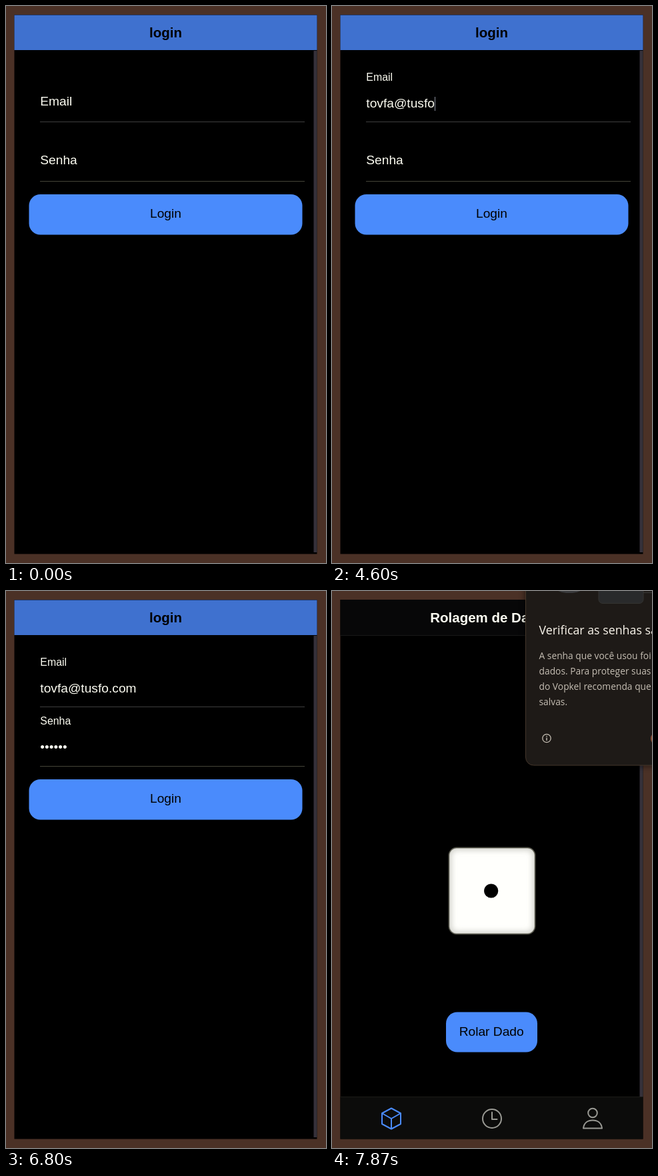
These frames come from a looping animation (480x834 px, 8 s). An HTML page:

```html
<!DOCTYPE html>
<html lang="pt">
<head>
<meta charset="utf-8">
<title>Login</title>
<style>
  html, body { margin: 0; width: 100%; height: 100%; overflow: hidden; background: #4b3126; }
  svg { position: absolute; left: 0; top: 0; display: block; }
  text { font-family: "Liberation Sans", Arial, sans-serif; font-size: 19.2px; fill: #fdfdf2; white-space: pre; }
  .title { font-size: 20.5px; font-weight: bold; }
  .mid { text-anchor: middle; }
  .dark { fill: #000; }
  .note text { font-family: "Open Sans", "Noto Sans", sans-serif; font-size: 13.8px; fill: #c6bfb4; }
  .note .head { font-size: 17.8px; fill: #fbf6ec; }
  .icon { fill: none; stroke: #9a9a94; stroke-width: 2; stroke-linecap: round; stroke-linejoin: round; }
</style>
</head>
<body>
<svg width="480" height="834" viewBox="0 0 480 834">
  <defs>
    <filter id="soft" x="-20%" y="-20%" width="140%" height="140%"><feGaussianBlur stdDeviation="4"/></filter>
    <clipPath id="face"><rect x="176" y="385" width="128" height="128" rx="11"/></clipPath>
  </defs>
  <rect width="480" height="834" fill="#4b3126"/>
  <rect x="12.5" y="13" width="454" height="807.5"/>

  <g id="loginPage">
    <rect x="12.5" y="13.5" width="454" height="52.5" fill="#3f71cf"/>
    <rect x="461.5" y="67" width="5" height="751" fill="#35313a"/>
    <text class="title mid dark" x="239.5" y="46.5">login</text>
    <rect x="51" y="173" width="397" height="1" fill="#3f3f3f"/>
    <rect x="51" y="262" width="397" height="1" fill="#444438"/>
    <text id="emailLabel" x="51.3">Email</text>
    <text id="passLabel" x="51.3">Senha</text>
    <text id="email" x="51.3" y="152"></text>
    <text id="pass" x="51.3" y="240"></text>
    <rect id="caret" width="1" height="21" fill="#8a8f9c"/>
    <rect id="button" x="34.5" y="282" width="410" height="60.5" rx="17"/>
    <text class="mid dark" x="239.5" y="317">Login</text>
  </g>

  <g id="dicePage">
    <rect x="12.5" y="13" width="454" height="53" fill="#070708"/>
    <rect x="12.5" y="66" width="454" height="1" fill="#191918"/>
    <rect x="461.5" y="67" width="5" height="690" fill="#35313a"/>
    <text class="title mid" x="239.5" y="46.5">Rolagem de Dados</text>

    <rect x="175.5" y="384.5" width="129" height="129" rx="11.5" fill="#fffffc" stroke="#55554a" stroke-width="2"/>
    <g clip-path="url(#face)">
      <rect x="175" y="384" width="130" height="130" rx="12" fill="none" stroke="#cfcfc8" stroke-width="8" filter="url(#soft)"/>
    </g>
    <circle cx="238.7" cy="449" r="10.6"/>

    <rect x="171" y="630.5" width="137" height="60" rx="17" fill="#4a8bfc"/>
    <text class="mid dark" x="239.2" y="665.5">Rolar Dado</text>

    <rect x="12.5" y="757" width="454" height="63.5" fill="#0c0c0b"/>
    <rect x="12.5" y="757" width="454" height="1" fill="#1c1c18"/>
    <path class="icon" style="stroke:#4a8bfc" d="M89 774.5 103 782V798L89 805.5 75 798V782ZM75 782 89 790 103 782M89 790V805"/>
    <g class="icon">
      <circle cx="240" cy="790" r="14"/>
      <path d="M240 780.5V791H247.5"/>
      <circle cx="391" cy="781.5" r="6.8"/>
      <path d="M377 804.5C378 796 384 792.5 391 792.5S404 796 405 804.5Z"/>
    </g>
  </g>

  <g id="notice" class="note">
    <rect x="289" y="-30" width="230" height="293" rx="14" fill="#000" opacity=".5" filter="url(#soft)"/>
    <rect x="290.5" y="-30" width="230" height="291" rx="12" fill="#1e1a17" stroke="#44362a"/>
    <ellipse cx="356" cy="-8" rx="24" ry="11" fill="#393a3c"/>
    <rect x="400" y="-20" width="67" height="38.5" rx="6" fill="#292a2b" stroke="#343432"/>
    <rect x="467" y="2" width="13" height="1" fill="#3a3a38"/>
    <text class="head" x="310.5" y="64.5">Verificar as senhas salvas</text>
    <g id="noticeBody"></g>
    <circle cx="322" cy="220.5" r="6.2" fill="none" stroke="#c6bfb4" stroke-width="1.3"/>
    <path d="M322 219.5V224M322 216.8V218.2" stroke="#c6bfb4" stroke-width="1.4"/>
    <circle cx="488" cy="221" r="10" fill="#8f5036"/>
  </g>
</svg>
<script>
  const LOOP = 8000;
  const EMAIL = "tovfa@tusfo.com";
  const emailKeys = [1730, 1870, 2000, 2200, 2330, 2730, 3000, 3130, 3270, 3530, 3600, 4670, 4800, 4870, 5000];
  const passKeys = [5670, 5800, 5870, 6070, 6130, 6270];
  const emailCaret = [[930, 1470], [1730, 4070], [4600, 5130]];
  const passCaret = [[5200, 6800]];
  const pressColors = [[0, "#4a8bfc"], [7200, "#4786f4"], [7330, "#4480ea"], [7400, "#417ade"]];
  const noticeLines = [
    "A senha que você usou foi exposta",
    "dados. Para proteger suas contas",
    "do Vopkel recomenda que você",
    "salvas."
  ];

  const $ = id => document.getElementById(id);
  const set = (el, attrs) => { for (const k in attrs) el.setAttribute(k, attrs[k]); };
  const show = (el, on) => { el.style.display = on ? "" : "none"; };
  const typed = (keys, t) => keys.filter(k => k <= t).length;
  const within = (spans, t) => spans.some(([a, b]) => t >= a && t < b);

  noticeLines.forEach((line, i) => {
    const row = document.createElementNS("http://www.w3.org/2000/svg", "text");
    set(row, { x: 310.5, y: 101.5 + i * 23.2 });
    row.textContent = line;
    $("noticeBody").append(row);
  });

  // The label shrinks upward at 15 pictures per second.
  function floatLabel(el, t, start, restY) {
    const tick = Math.floor((t + 4) * 0.015) / 0.015;
    const p = Math.min(1, Math.max(0, (tick - start) / 150));
    const e = p * p * (3 - 2 * p);
    el.setAttribute("y", restY - 37.5 * e);
    el.style.fontSize = 19.2 - 3.3 * e + "px";
  }

  function draw(t) {
    const onLogin = t < 7470;
    show($("loginPage"), onLogin);
    show($("dicePage"), !onLogin);
    show($("notice"), t >= 7870);
    if (!onLogin) return;

    $("email").textContent = EMAIL.slice(0, typed(emailKeys, t));
    $("pass").textContent = "•".repeat(typed(passKeys, t));
    floatLabel($("emailLabel"), t, emailKeys[0], 149);
    floatLabel($("passLabel"), t, passKeys[0], 237);

    const inEmail = within(emailCaret, t);
    const inPass = within(passCaret, t);
    show($("caret"), inEmail || inPass);
    const field = $(inPass ? "pass" : "email");
    const width = field.textContent ? field.getComputedTextLength() : 0;
    set($("caret"), { x: Math.round(51.6 + width), y: inPass ? 224 : 136 });
    $("button").setAttribute("fill", pressColors.filter(([at]) => at <= t).pop()[1]);
  }

  function loop() {
    draw(performance.now() % LOOP);
    requestAnimationFrame(loop);
  }
  loop();
</script>
</body>
</html>
```
